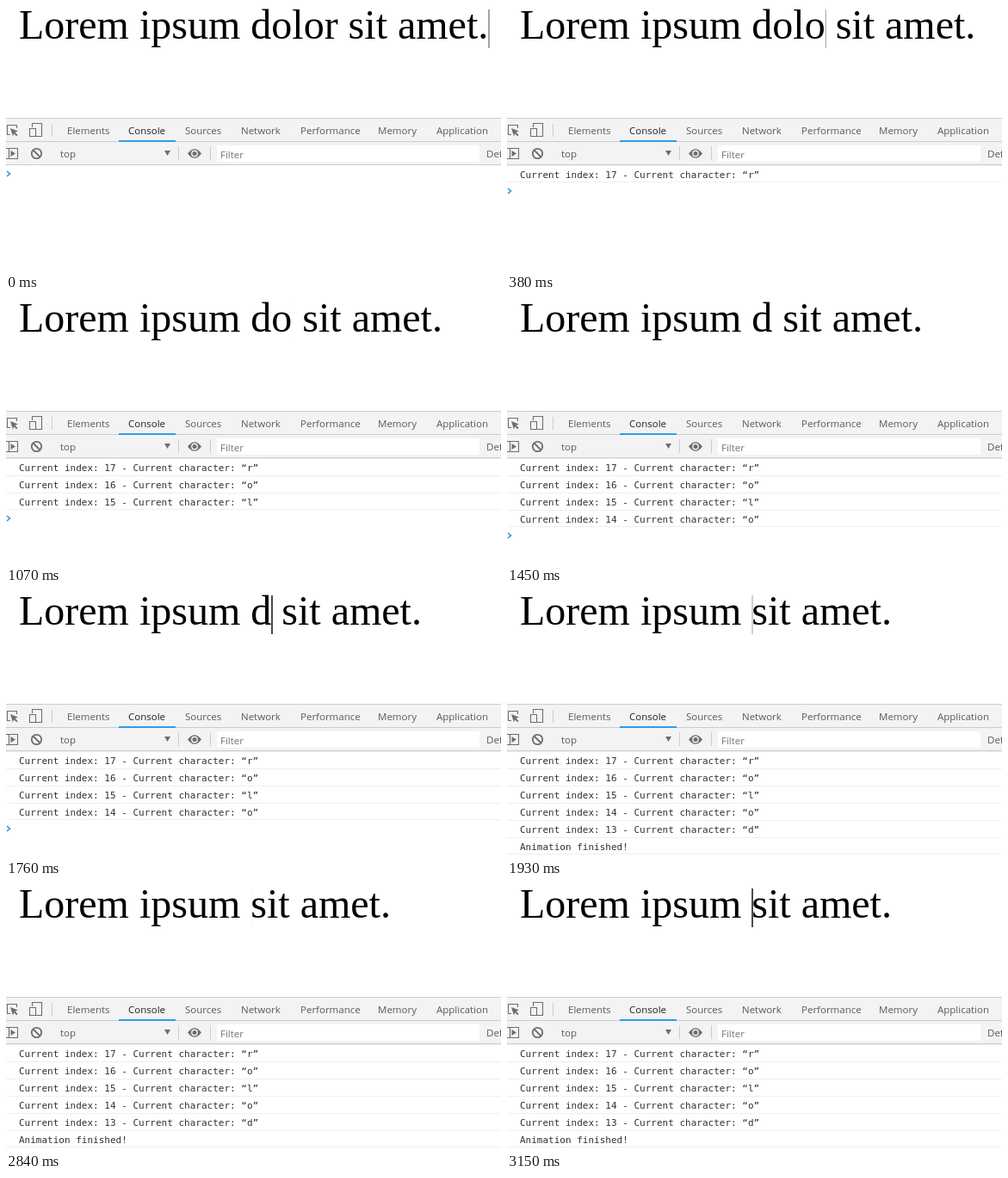
These frames come from a looping animation (575x308 px, 3230 ms). An HTML page:

```html
<!DOCTYPE html>
<html lang="en">
<head>
<meta charset="utf-8">
<title>Deleting a word</title>
<style>
  html, body { margin: 0; width: 100%; height: 100%; overflow: hidden; background: #fff; }
  svg { display: block; }
  #sentence { font: 48px "Liberation Serif", serif; }
  .ui { font: 11.5px "Open Sans", sans-serif; fill: #5a5a5a; }
  .log { font: 11px "DejaVu Sans Mono", monospace; fill: #303030; }
  .icon { fill: none; stroke: #6e6e6e; stroke-width: 1.1; }
  .solid { fill: #6e6e6e; }
  .rule { stroke: #ccc; }
  .row-rule { stroke: #efefef; }
</style>
</head>
<body>
<svg width="575" height="308" viewBox="0 0 575 308">
  <text id="sentence" x="15" y="38"></text>
  <rect id="caret" y="4" width="1.4" height="45"/>

  <g id="logs" class="log"></g>
  <g id="prompt">
    <path class="row-rule" d="M0 184.5H575"/>
    <path d="M1 192L4.5 195L1 198" fill="none" stroke="#2d95d3" stroke-width="1.6"/>
  </g>

  <!-- tab bar and toolbar -->
  <rect y="130" width="575" height="55" fill="#f3f3f3"/>
  <path class="rule" d="M0 130.5H575M0 157.5H575M0 184.5H575M53.5 137V152M200.5 163V179M237.5 163V179"/>
  <rect x="131" y="156" width="66" height="2" fill="#2a9fe6"/>
  <g id="tabs" class="ui"></g>

  <!-- inspect and device icons -->
  <path class="icon" d="M5 149.5H1.5V138.5H12.5V142"/>
  <path class="solid" d="M5 142L14 145.5L10.6 146.8L13.6 149.9L12.2 151.3L9.2 148.2L8 151.5Z"/>
  <path class="icon" d="M30.5 141V136.5H41.5V151.5H35M27.5 142.5H34.5V151.5H27.5Z"/>

  <!-- sidebar, clear, context and eye -->
  <path class="icon" d="M0 165.5H13.5V177.5H0M3.5 165.5V177.5"/>
  <path class="solid" d="M5.5 168L11 171.5L5.5 175Z"/>
  <g class="icon" style="stroke-width:1.8">
    <circle cx="35.5" cy="171.5" r="5.7"/>
    <path d="M31.5 167.5L39.5 175.5"/>
  </g>
  <path class="solid" d="M184 168H191L187.5 174Z"/>
  <path class="solid" d="M211 171.5Q219 161 227 171.5Q219 182 211 171.5Z"/>
  <circle cx="219" cy="171.5" r="3.2" fill="none" stroke="#f3f3f3" stroke-width="1.4"/>
  <rect x="245" y="162" width="305" height="19" fill="#fff"/>
  <g class="ui">
    <text x="63" y="176">top</text>
    <text x="249" y="177" fill="#757575">Filter</text>
    <text x="558" y="176">Default</text>
  </g>
</svg>
<script>
const LOOP = 3230, BLINK = 1000, ROW = 20, WORD = "dolor", FIRST_INDEX = 13;

// Each stage removes one more letter: [start time, caret blink phase at that time]
const STAGES = [[0, 150], [300, 5], [690, 10], [1070, 2], [1450, 0], [1930, 80]];
const TABS = { Elements: 71, Console: 142, Sources: 208, Network: 273, Performance: 342, Memory: 432, Application: 500 };

const $ = id => document.getElementById(id);

$("tabs").innerHTML = Object.entries(TABS).map(([name, x]) =>
  `<text x="${x}" y="149"${name === "Console" ? ' fill="#222"' : ""}>${name}</text>`).join("");

const lines = [...WORD].map((letter, i) =>
  `Current index: ${FIRST_INDEX + i} - Current character: “${letter}”`).reverse();
lines.push("Animation finished!");

$("logs").innerHTML = lines.map((line, i) =>
  `<g><path class="row-rule" d="M0 ${185.5 + i * ROW}H575"/>
   <text x="15" y="${200 + i * ROW}">${line}</text></g>`).join("");

let shown = -1;

function showStage(removed) {
  if (removed === shown) return;
  shown = removed;
  const sentence = $("sentence");
  sentence.textContent = `Lorem ipsum ${WORD.slice(0, WORD.length - removed)} sit amet.`;
  const before = removed ? 16 - removed : sentence.getNumberOfChars() - 1;
  $("caret").setAttribute("x", sentence.getEndPositionOfChar(before).x);

  const count = removed === WORD.length ? lines.length : removed;
  [...$("logs").children].forEach((row, i) => row.style.display = i < count ? "" : "none");
  // The prompt's rule covers the row boundary just above it
  $("prompt").setAttribute("transform", `translate(0 ${count * ROW})`);
}

// Fade in for 30% of the blink, hold, then fade out for the last 30%
function caretOpacity(phase) {
  const p = phase % BLINK / BLINK;
  return Math.min(1, Math.min(p, 1 - p) / 0.3);
}

const origin = performance.now();

function draw() {
  const t = (performance.now() - origin) % LOOP;
  const stage = STAGES.findLastIndex(([start]) => t >= start);
  const [start, phase] = STAGES[stage];
  showStage(stage);
  $("caret").setAttribute("opacity", caretOpacity(t - start + phase));
  requestAnimationFrame(draw);
}
draw();
</script>
</body>
</html>
```
